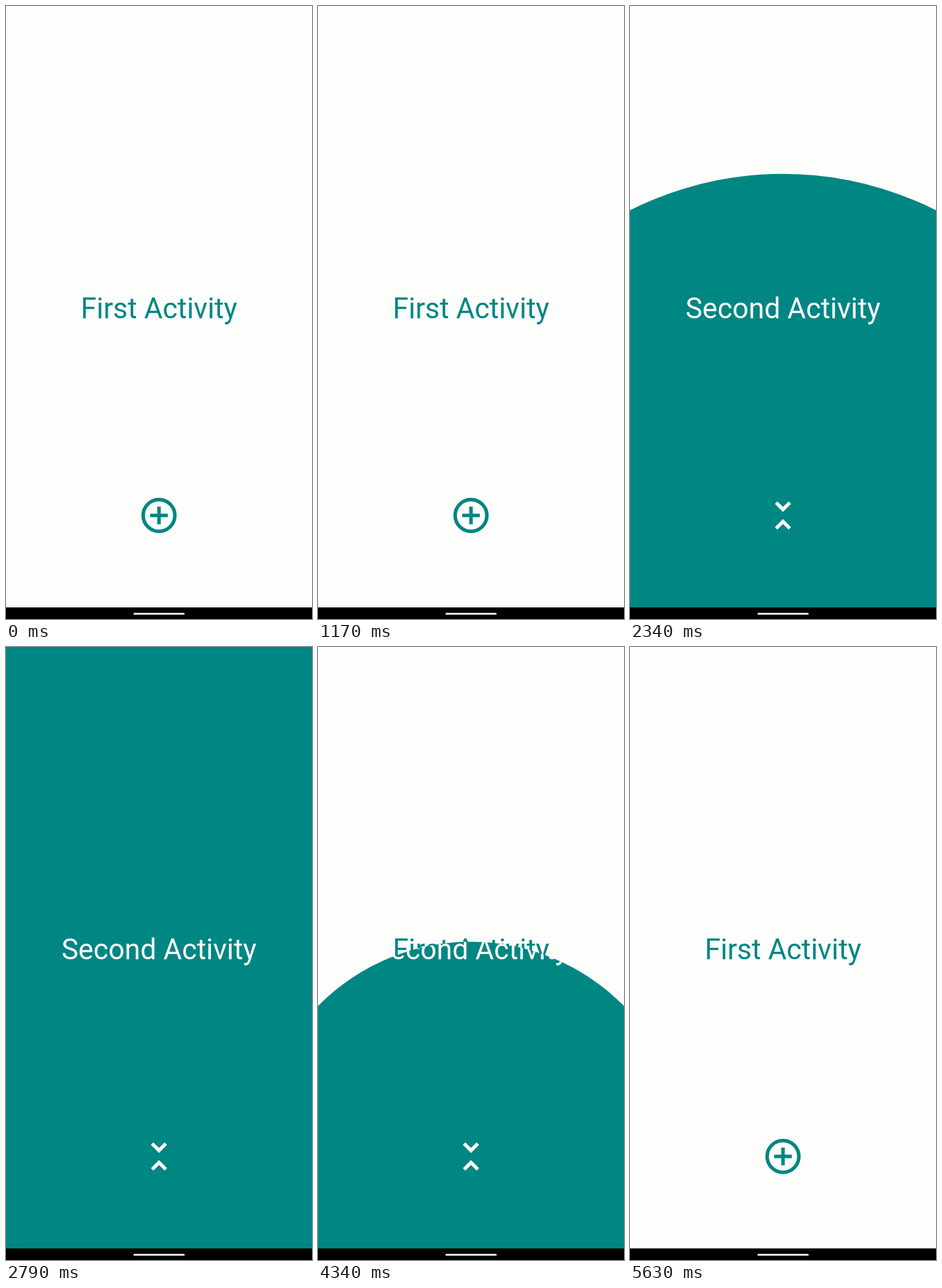
An HTML page for the animation above (5670 ms loop, 529 px wide and 1058 px high).

```html
<!DOCTYPE html>
<html lang="en">
<head>
<meta charset="utf-8">
<title>Circular reveal</title>
<style>
html, body { margin: 0; width: 100%; height: 100%; overflow: hidden; background: #fdfdfc; }
svg { display: block; width: 100vw; height: 100vh; }
text { font: 400 49.2px Roboto, sans-serif; text-anchor: middle; }
</style>
</head>
<body>
<svg viewBox="0 0 529 1058">
  <defs>
    <clipPath id="clip"><circle id="hole" cx="264.5" cy="879.3" r="0"/></clipPath>
  </defs>

  <rect width="529" height="1058" fill="#fdfdfc"/>
  <g fill="#008683">
    <text x="264.5" y="539">First Activity</text>
    <g transform="translate(264.5 879.3) scale(3.05)" fill="none" stroke="#008683" stroke-width="2">
      <circle r="9"/>
      <path d="M-5 0H5M0-5V5"/>
    </g>
  </g>

  <g id="second" clip-path="url(#clip)" fill="#fff">
    <rect width="529" height="1058" fill="#008683"/>
    <text x="264.5" y="539">Second Activity</text>
    <path transform="translate(264.5 879.3) scale(3.05) translate(-12 -12)"
      d="M7.41 18.59L8.83 20 12 16.83 15.17 20l1.41-1.41L12 14zM16.59 5.41L15.17 4 12 7.17 8.83 4 7.41 5.41 12 10z"/>
  </g>

  <rect y="1038" width="529" height="20" fill="#000"/>
  <rect x="220.3" y="1047.6" width="88.6" height="3" rx="1.5" fill="#fff"/>
</svg>
<script>
const LOOP = 5670, MAX_R = 1142;
const OPEN = { at: 1269, len: 1492 };
const CLOSE = { at: 3717, len: 1016 };
const hole = document.getElementById("hole");
const second = document.getElementById("second");

const progress = (t, { at, len }) => Math.min(1, Math.max(0, (t - at) / len));

// Accelerates while opening, eases in and out while closing.
function radius(t) {
  if (t < CLOSE.at) return MAX_R * progress(t, OPEN) ** 2;
  return MAX_R * (1 + Math.cos(Math.PI * progress(t, CLOSE))) / 2;
}

function draw(t) {
  const r = radius(t);
  hole.setAttribute("r", r.toFixed(2));
  second.style.display = r > 0 ? "" : "none";
}

const start = performance.now();
function tick() {
  draw((performance.now() - start) % LOOP);
  requestAnimationFrame(tick);
}
tick();
</script>
</body>
</html>
```
